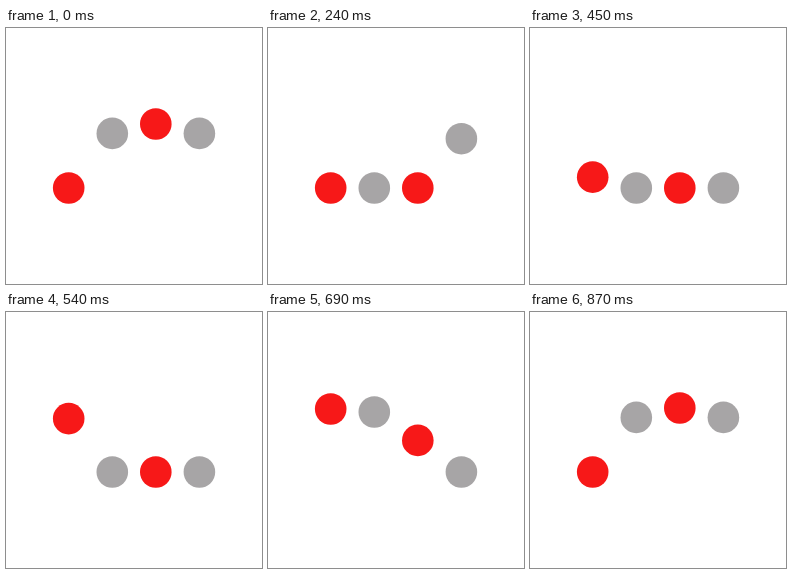
An HTML page for the animation above (0.9 s loop, 256 by 256 pixels).

```html
<!DOCTYPE html>
<html lang="en">
<head>
<meta charset="utf-8">
<title>Bouncing dots</title>
<style>
  html, body { margin: 0; width: 100%; height: 100%; overflow: hidden; background: #fff; }
  svg { display: block; width: 100vw; height: 100vh; }
  .red { fill: #f71818; }
  .gray { fill: #a7a5a6; }
</style>
</head>
<body>
<svg viewBox="0 0 256 256">
  <circle class="red" cx="62.7" cy="160" r="15.8"/>
  <circle class="gray" cx="106.3" cy="160" r="15.8"/>
  <circle class="red" cx="149.8" cy="160" r="15.8"/>
  <circle class="gray" cx="193.4" cy="160" r="15.8"/>
</svg>
<script>
  const dots = document.querySelectorAll('circle');
  const LOOP = 900, STEP = 30;
  const CYCLE = 29;              // steps; the last pose repeats the first
  const FLOOR = 160, RISE = 64;
  const HALF = 6.9;              // steps from floor to peak
  const START = 14.9, STAGGER = 3.6;

  // circular ease out on the way up, circular ease in on the way down
  function height(phase) {
    const d = (phase - HALF) / HALF;
    return d < 1 ? RISE * Math.sqrt(1 - d * d) : 0;
  }

  function draw(now) {
    const step = Math.floor((now % LOOP) / STEP);
    dots.forEach((dot, i) => {
      const phase = (step - START - i * STAGGER + 2 * CYCLE) % CYCLE;
      dot.setAttribute('cy', (FLOOR - height(phase)).toFixed(2));
    });
  }

  function tick(now) {
    draw(now);
    requestAnimationFrame(tick);
  }

  draw(0);
  requestAnimationFrame(tick);
</script>
</body>
</html>
```
